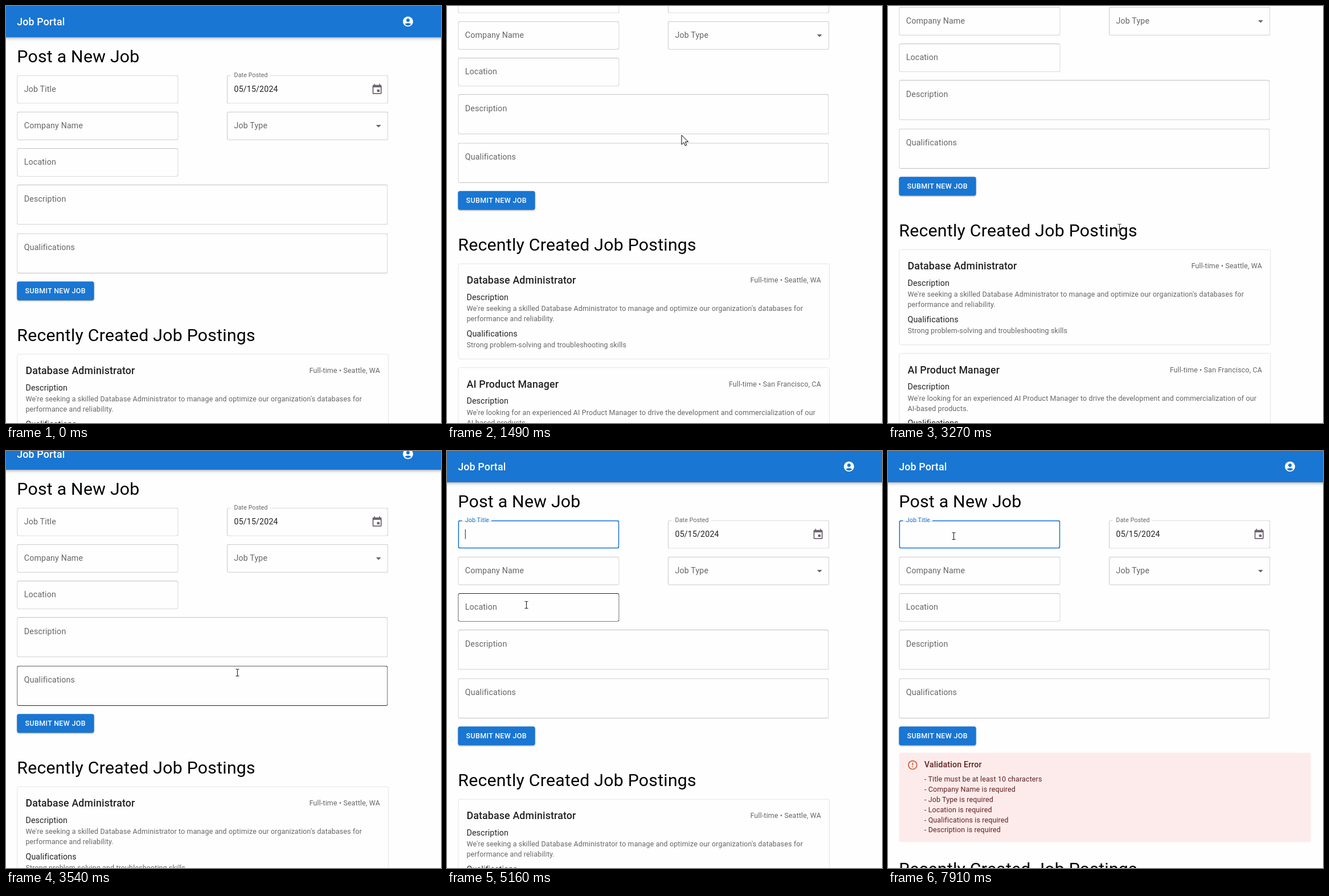
An HTML page that plays this animation: 764x733 px, repeating every 8000 ms.

```html
<!DOCTYPE html>
<html lang="en">
<head>
<meta charset="utf-8">
<title>Job Portal</title>
<style>
html, body { margin: 0; width: 100%; height: 100%; overflow: hidden; background: #fefefe; }
body { position: relative; font-family: Roboto, Arial, sans-serif; color: rgba(0,0,0,.87); cursor: none; }
#page, #recent, .post { position: absolute; left: 0; top: 0; width: 858px; }
#page { transform-origin: 0 0; }
p, header, svg, .field, .field *, .card, #submit, #ripple, #alert { position: absolute; margin: 0; }
p, .field span { white-space: nowrap; }
header { left: -2px; top: -2px; width: 864px; height: 64px; background: #1976d2;
  box-shadow: 0 2px 4px -1px rgba(0,0,0,.2), 0 4px 5px rgba(0,0,0,.14), 0 1px 10px rgba(0,0,0,.12); }
.h4 { font-size: 34px; line-height: 42px; letter-spacing: .25px; color: #000; }
.h6 { font-size: 20px; line-height: 32px; letter-spacing: .15px; font-weight: 500; }
.body1 { font-size: 16px; line-height: 24px; letter-spacing: .15px; }
.body2 { font-size: 14px; line-height: 20px; letter-spacing: .15px; }
.muted { color: rgba(0,0,0,.6); }
.field { --line: #c0c0c0; --width: 1px; border-radius: 4px; box-shadow: inset 0 0 0 var(--width) var(--line); }
.field * { pointer-events: none; }
.field.hover { --line: #212121; }
.field .body1 { line-height: 23px; }
.field span { left: 14px; top: 16px; transform-origin: 0 0; }
.notch { left: 8px; top: 0; height: 2px; background: #fefefe; }
.card { left: 22px; width: 733px; height: 189px; box-sizing: border-box; border: 1px solid #e0e0e0; border-radius: 4px; }
#submit { left: 22px; top: 544px; width: 152px; height: 36.5px; border-radius: 4px; overflow: hidden; }
#submit p { color: #fff; font-weight: 500; letter-spacing: .4px; }
#ripple { left: -2px; top: -94px; width: 222px; height: 222px; border-radius: 50%; background: #fff; }
#alert { left: 22px; top: 596px; width: 812px; height: 176px; border-radius: 4px; background: #fdebeb; color: #5f2120; }
#caret { left: 14px; top: 18px; width: 1px; height: 19px; background: #000; }
#pointer { left: 0; top: 0; overflow: visible; pointer-events: none; }
</style>
</head>
<body>
<div id="page"></div>
<svg id="pointer" width="1" height="1">
  <path id="arrow" d="M0 0V16.5L3.9 12.8L6.4 18.6L9 17.5L6.5 11.8H11.8Z" fill="#fff" stroke="#000"/>
  <g id="beam" fill="none">
    <path d="M-3-6H-1Q0-6 0-5Q0-6 1-6H3M0-5V5M-3 6H-1Q0 6 0 5Q0 6 1 6H3" stroke="#fff" stroke-width="2.4" opacity=".6"/>
    <path d="M-3-6H-1Q0-6 0-5Q0-6 1-6H3M0-5V5M-3 6H-1Q0 6 0 5Q0 6 1 6H3" stroke="#222" stroke-width="1.1"/>
  </g>
  <path id="hand" fill="#fff" stroke="#000" stroke-linejoin="round"
    d="M-1.5 .3Q0-1.6 1.5 .3V6.2Q4 5 4.4 7Q6.4 6 6.9 7.9Q8.6 7.4 8.6 9.6V12.5Q8.4 15 7 17.8H-.6Q-2 15-4.8 11.6Q-5.2 8.8-3.4 9L-1.5 10.8Z"/>
</svg>
<script>
const LOOP = 8000;
const SCALE = .8907; // the page is laid out in its own pixels and shown at this scale
const $ = id => document.getElementById(id);

const text = (x, y, cls, str, style = '') =>
  `<p class="${cls}" style="left:${x}px;top:${y}px;${style}">${str}</p>`;

// Icons are placed by their centre.
const icon = (x, y, size, color, d) =>
  `<svg viewBox="0 0 24 24" width="${size}" height="${size}" style="left:${x - size / 2}px;top:${y - size / 2}px" fill="${color}"><path d="${d}"/></svg>`;

const field = (id, x, y, w, h, label, extra = '') =>
  `<div class="field" id="${id}" style="left:${x}px;top:${y}px;width:${w}px;height:${h}px">${extra}<span class="body1 muted">${label}</span></div>`;

const post = (y, title, meta, description, qualification) =>
  `<div class="post" style="top:${y}px"><div class="card"></div>` +
  text(39, 17, 'h6', title) +
  text(0, 23, 'body2 muted', meta, 'left:auto;right:120px') +
  text(39, 55, 'body1', 'Description') +
  description.map((line, i) => text(39, 79 + 20 * i, 'body2 muted', line)).join('') +
  text(39, 127, 'body1', 'Qualifications') +
  text(39, 151, 'body2 muted', qualification) + '</div>';

const errors = ['Title must be at least 10 characters', 'Company Name is required', 'Job Type is required',
  'Location is required', 'Qualifications is required', 'Description is required'];

$('page').innerHTML =
  '<header></header>' + text(22, 15, 'h6', 'Job Portal', 'color:#fff') +
  icon(793.4, 31, 24, '#fff', 'M12 2C6.48 2 2 6.48 2 12s4.48 10 10 10 10-4.48 10-10S17.52 2 12 2zm0 4c1.93 0 3.5 1.57 3.5 3.5S13.93 13 12 13s-3.5-1.57-3.5-3.5S10.07 6 12 6zm0 14c-2.03 0-4.43-.82-6.14-2.88C7.55 15.8 9.68 15 12 15s4.45.8 6.14 2.12C16.43 19.18 14.03 20 12 20z') +
  text(22, 79, 'h4', 'Post a New Job') +
  field('title', 22, 137, 318, 56, 'Job Title', '<div class="notch" id="notch"></div><div id="caret"></div>') +
  field('date', 436, 137, 318, 56, 'Date Posted', '<div class="notch" style="width:77px"></div>' +
    text(14, 16, 'body1', '05/15/2024') +
    icon(296, 28, 24, '#6e6470', 'M17 12h-5v5h5v-5zM16 1v2H8V1H6v2H5c-1.11 0-1.99.9-1.99 2L3 19c0 1.1.89 2 2 2h14c1.1 0 2-.9 2-2V5c0-1.1-.9-2-2-2h-1V1h-2zm3 18H5V8h14v11z')) +
  field('company', 22, 209, 318, 56, 'Company Name') +
  field('type', 436, 209, 318, 56, 'Job Type', icon(299, 28, 24, '#666', 'M7 10l5 5 5-5z')) +
  field('location', 22, 281, 318, 56, 'Location') +
  field('description', 22, 353, 731, 79, 'Description') +
  field('qualifications', 22, 449, 731, 79, 'Qualifications') +
  '<div id="submit"><div id="ripple"></div>' + text(16, 8, 'body2', 'SUBMIT NEW JOB') + '</div>' +
  '<div id="alert">' +
  icon(27, 24, 22, '#d0582f', 'M11 15h2v2h-2zm0-8h2v6h-2zm.99-5C6.47 2 2 6.48 2 12s4.47 10 9.99 10C17.52 22 22 17.52 22 12S17.52 2 11.99 2zM12 20c-4.42 0-8-3.58-8-8s3.58-8 8-8 8 3.58 8 8-3.58 8-8 8z') +
  text(50, 12, 'body1', 'Validation Error', 'font-weight:500') +
  errors.map((e, i) => text(50, 42 + 20 * i, 'body2', '- ' + e)).join('') + '</div>' +
  '<div id="recent">' + text(22, 629, 'h4', 'Recently Created Job Postings') +
  post(687, 'Database Administrator', 'Full-time • Seattle, WA',
    ["We're seeking a skilled Database Administrator to manage and optimize our organization's databases for", 'performance and reliability.'],
    'Strong problem-solving and troubleshooting skills') +
  post(892, 'AI Product Manager', 'Full-time • San Francisco, CA',
    ["We're looking for an experienced AI Product Manager to drive the development and commercialization of our", 'AI-based products.'],
    'Excellent communication and leadership skills') + '</div>';

const titleLabel = $('title').querySelector('span');
const placeLabel = (label, p) => label.style.transform = p ? `translateY(${-25 * p}px) scale(${1 - .25 * p})` : 'none';
placeLabel($('date').querySelector('span'), 1);

const ramp = (t, from, to) => Math.min(1, Math.max(0, (t - from) / (to - from)));
const easeOut = p => 1 - (1 - p) ** 3;
const easeInOut = p => p * p * (3 - 2 * p);
const mix = (a, b, p) => a + (b - a) * p;

// Pointer stops: time, x, y.
const stops = [[100, 470, 745], [880, 408, 217], [1200, 408, 217], [1800, 416, 237], [2620, 416, 237],
  [3200, 406, 389], [3890, 406, 389], [3950, 409, 382], [4650, 150, 150], [4880, 150, 150],
  [5590, 117, 498], [6440, 117, 498], [7240, 115, 149], [LOOP, 115, 149]];

function pointerAt(t) {
  const i = Math.max(1, stops.findIndex(s => s[0] > t));
  const [a, b] = [stops[i - 1], stops[i]];
  const p = easeInOut(ramp(t, a[0], b[0]));
  return [mix(a[1], b[1], p), mix(a[2], b[2], p)];
}

const FOCUS = 4720, PRESS = 5870, RELEASE = 5960, REFOCUS = 7390;

function drawTitle(t) {
  const focused = t >= FOCUS && t < PRESS || t >= REFOCUS;
  const start = t >= REFOCUS ? REFOCUS : FOCUS;
  const shift = at => easeOut(ramp(t, at, at + 200));
  const p = shift(FOCUS) - shift(PRESS) + shift(REFOCUS);
  placeLabel(titleLabel, p);
  titleLabel.style.color = `color-mix(in srgb, #1976d2 ${p * 100}%, rgba(0,0,0,.6))`;
  const open = ramp(t, start + 50, start + 150) - (t < REFOCUS ? ramp(t, PRESS, PRESS + 50) : 0);
  $('notch').style.width = 58 * open + 'px';
  $('title').style.setProperty('--width', focused ? '2px' : '1px');
  $('title').style.setProperty('--line', focused ? '#1976d2' : '');
  $('caret').hidden = !focused || Math.floor((t - start) / 500) % 2 === 1;
}

function drawSubmit(t) {
  const h = ramp(t, 5500, 5750) - ramp(t, 6560, 6810);
  $('submit').style.background = `color-mix(in srgb, #1565c0 ${h * 100}%, #1976d2)`;
  $('submit').style.boxShadow = `0 ${3 - h}px ${1 + 3 * h}px ${h - 2}px rgba(0,0,0,.2),
    0 ${2 + 2 * h}px ${2 + 3 * h}px rgba(0,0,0,.14), 0 1px ${5 + 5 * h}px rgba(0,0,0,.12)`;
  const grow = Math.sin(ramp(t, PRESS, PRESS + 550) * Math.PI / 2) ** 1.6;
  $('ripple').style.transform = `scale(${grow})`;
  $('ripple').style.opacity = .3 * (1 - easeInOut(ramp(t, RELEASE, RELEASE + 550)));
}

function drawPointer(t) {
  const [x, y] = pointerAt(t).map(Math.round);
  const hit = document.elementFromPoint(x, y);
  const over = hit?.closest('.field');
  document.querySelectorAll('.field').forEach(f => f.classList.toggle('hover', f === over));
  const kind = hit?.closest('#type, #submit') ? 'hand' : hit?.closest('.field, p') ? 'beam' : 'arrow';
  for (const id of ['arrow', 'beam', 'hand']) $(id).style.display = id === kind ? '' : 'none';
  const half = kind === 'beam' ? .5 : 0;
  $('pointer').style.transform = `translate(${x + half}px, ${y + half}px)`;
  $('pointer').style.visibility = t < 130 ? 'hidden' : 'visible';
}

function draw(now) {
  const t = now % LOOP;
  const scroll = 227 * (easeOut(ramp(t, 1200, 2080)) - easeOut(ramp(t, 3233, 3800)));
  $('page').style.transform = `translate(-.3px, ${-.3 - Math.round(scroll)}px) scale(${SCALE})`;
  const failed = t >= RELEASE;
  $('alert').style.display = failed ? '' : 'none';
  $('recent').style.top = failed ? '175px' : 0;
  drawTitle(t);
  drawSubmit(t);
  drawPointer(t);
  requestAnimationFrame(draw);
}
requestAnimationFrame(draw);
</script>
</body>
</html>
```
